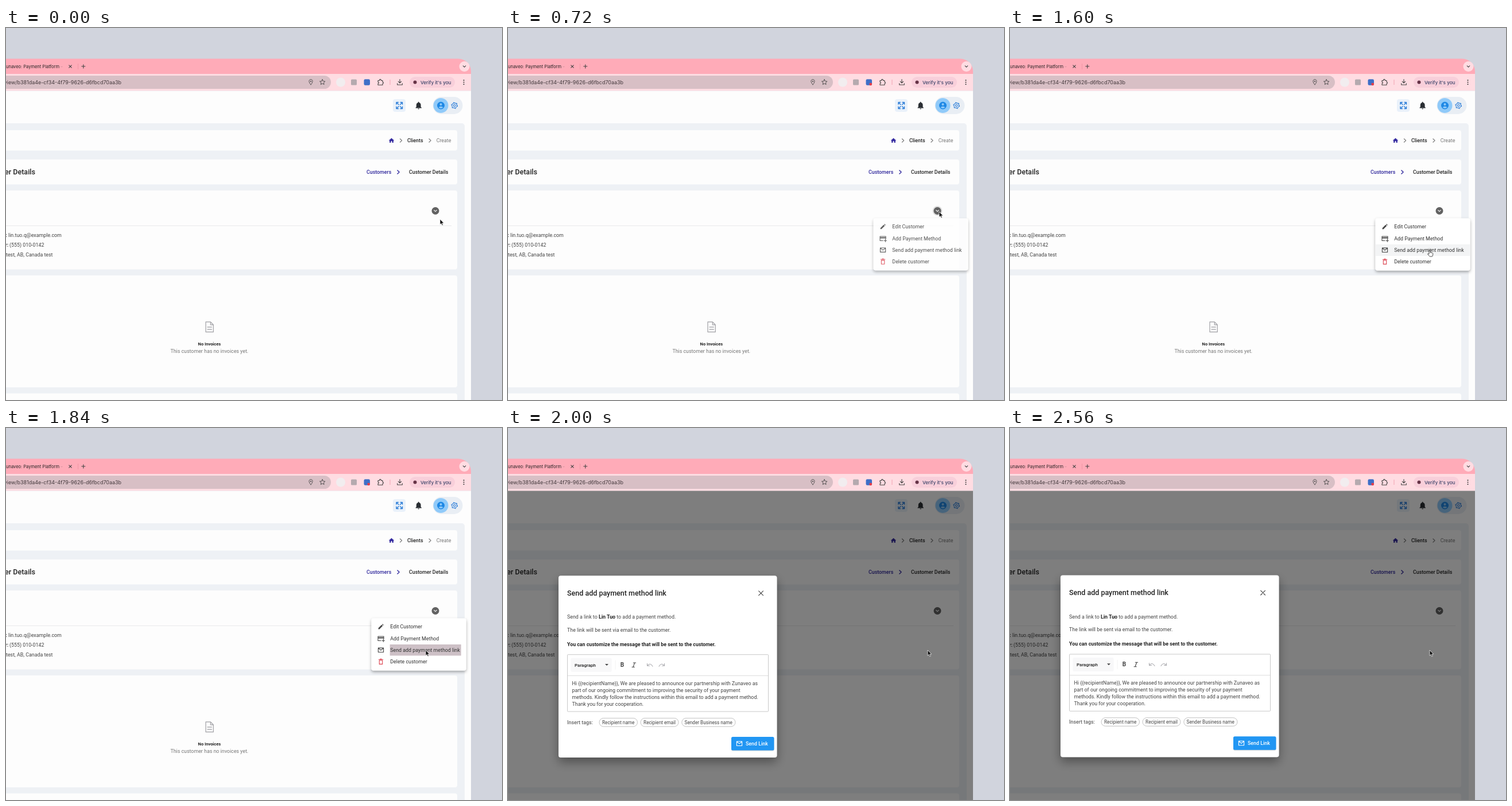
These frames come from a looping animation (864x648 px, 3.2 s). An HTML page:

```html
<!DOCTYPE html>
<html lang="en">
<head>
<meta charset="utf-8">
<title>Send add payment method link</title>
<style>
  html, body { margin: 0; width: 100%; height: 100%; overflow: hidden; background: #d1d4dd; }
  svg { display: block; width: 864px; height: 648px; font: 8.85px Roboto, sans-serif; fill: #444; }
  .ui { font-family: Inter, sans-serif; }
  .medium { font-weight: 500; }
  .bold { font-weight: 700; }
  .dark { fill: #222; }
  .end { text-anchor: end; }
  .mid { text-anchor: middle; }
  .line { fill: none; stroke: #444; stroke-width: 1.1; stroke-linecap: round; stroke-linejoin: round; }
  .thin { stroke-width: .9; }
  .thick { stroke-width: 1.4; }
  .blue { stroke: #2f7fd8; }
  .indigo { stroke: #2d259b; }
  .grey { stroke: #777; }
  .pale { stroke: #acacb0; }
  .white { stroke: #fff; }
  .red { stroke: #dc4350; }
  .card { fill: #fdfdfd; }
  .chip { fill: #fff; stroke: #a8a8a8; stroke-width: .7; }
  .small { font-size: 8.2px; }
</style>
</head>
<body>
<svg viewBox="0 0 864 648">
  <defs>
    <path id="right" d="M-1.6-3 1.6 0-1.6 3"/>
    <path id="down" d="M-2.3-1.1 0 1.2 2.3-1.1"/>
    <path id="envelope" d="M-4.6-3.7H4.6V3.7H-4.6ZM-4.6-3.3 0 .2 4.6-3.3"/>
    <filter id="menuShadow" x="-15%" y="-15%" width="130%" height="140%">
      <feDropShadow dx="0" dy="2.5" stdDeviation="2.7" flood-opacity=".34"/>
    </filter>
    <filter id="dialogShadow" x="-15%" y="-15%" width="130%" height="135%">
      <feDropShadow dx="0" dy="8" stdDeviation="9" flood-opacity=".36"/>
    </filter>
  </defs>

  <rect width="864" height="648" fill="#d1d4dd"/>

  <!-- Browser bar -->
  <path d="M0 53.5H788a22 22 0 0 1 22 22V81H0Z" fill="#ffabb8"/>
  <rect y="80" width="810" height="29.5" fill="#ffdce2"/>
  <g class="ui">
    <text class="end dark" x="93" y="69.6" font-size="7.5">Zunaveo: Payment Platform</text>
    <text x="95" y="69.6" font-size="7.5" opacity=".3">–</text>
    <path class="line" d="m109.8 64.8 4.4 4.4m0-4.4-4.4 4.4M131.7 66.8h6.2m-3.1-3.1v6.2"/>
    <path d="M125.5 62v10" stroke="#e98e9d" stroke-width=".7"/>
    <circle cx="798.5" cy="67" r="9" fill="#ffdce2"/>
    <use href="#down" x="798.5" y="67" class="line"/>
    <path d="M0 83H554.5a11.5 11.5 0 0 1 0 23H0Z" fill="#d8bfc5"/>
    <text class="end" x="201" y="97.5" font-size="8.95" fill="#44383c">view/b381da4e-cf34-4f79-9626-d6fbcd70aa3b</text>
    <path class="line thin" d="M531 98.7c-4.6-5-3.5-9 0-9s4.6 4 0 9Z"/>
    <circle cx="531" cy="93" r="1.1"/>
    <path class="line thin" d="m551.2 89.6 1.4 3 3.3.4-2.5 2.2.7 3.2-2.9-1.7-2.9 1.7.7-3.2-2.5-2.2 3.3-.4Z"/>
    <circle cx="583" cy="94.5" r="8" fill="#f2edef"/>
    <rect x="601" y="89.5" width="10" height="10" rx="1.5" fill="#b5aaaf"/>
    <rect x="623.5" y="89.3" width="10.5" height="10.5" rx="2.3" fill="#3f6fc8"/>
    <circle id="badge" cx="631.7" cy="97.8" r="2.4" fill="#e53d48"/>
    <path class="line" d="M648 91.5h2.500v-.7a1.400 1.400 0 0 1 2.800 0v.7h2.700v2.600a1.400 1.400 0 0 1 0 2.800v2.300h-8v-2.300a1.400 1.400 0 0 0 0-2.800Z"/>
    <path d="M669 90v9" stroke="#f2a3b2"/>
    <path class="line" d="M686 89.5v6.3m-2.7-2.600 2.700 2.700 2.700-2.700M681.700 96.500v2.500h8.600v-2.500"/>
    <rect x="703" y="85" width="79" height="19" rx="9.5" fill="#f8cfda"/>
    <circle cx="712.5" cy="94.5" r="3" fill="#673347"/>
    <text class="medium" x="722" y="97.6" font-size="8.15" fill="#384067">Verify it's you</text>
    <g fill="#333"><circle cx="797.5" cy="91" r="1"/><circle cx="797.5" cy="94.5" r="1"/><circle cx="797.5" cy="98" r="1"/></g>
  </g>

  <!-- Page -->
  <rect y="109.5" width="810" height="539" fill="#fdfdfd"/>
  <path d="M0 166H794a5 5 0 0 1 5 5V648H0Z" fill="#eef1f5"/>
  <rect x="674" y="124" width="22" height="22" rx="4" fill="#e9f1fa"/>
  <path class="line thick blue" d="M680 133v-3.500h3.500M680 129.500l4 4M687 129.500h3.500v3.500M690.500 129.500l-4 4M680 137v3.500h3.500M680 140.500l4-4M687 140.500h3.500V137M690.500 140.500l-4-4"/>
  <path d="M713.5 138.800l1.300-1.400v-3.500c0-2 1.300-3.400 3-3.800v-.6a.9.900 0 0 1 1.800 0v.6c1.800.4 3 1.800 3 3.800v3.500l1.300 1.400v.6h-10.400ZM717.400 140.200h2.600a1.300 1.300 0 0 1-2.600 0Z" fill="#2a2e33"/>
  <rect x="743.5" y="120" width="52" height="30" rx="15" fill="#e9eef4"/>
  <circle cx="757.5" cy="135" r="13" fill="#90caf9"/>
  <circle cx="757.5" cy="135" r="6.5" fill="#1e88e5"/>
  <circle cx="757.5" cy="133" r="2" fill="#90caf9"/>
  <path d="M753.5 138.300q4-3.500 8 0-4 3.500-8 0Z" fill="#90caf9"/>
  <circle class="line blue" cx="781.2" cy="135" r="1.8"/>
  <circle class="line blue" cx="781.2" cy="135" r="4.4"/>
  <circle class="line blue" cx="781.2" cy="135" r="5.3" stroke-dasharray="2 3.55" style="stroke-linecap:butt"/>

  <g class="card">
    <rect x="-9" y="178" width="795" height="35.5" rx="4"/>
    <rect x="-9" y="229" width="795" height="43.5" rx="4"/>
    <rect x="-9" y="283" width="795" height="137.5" rx="4"/>
    <rect x="-9" y="431" width="795" height="195" rx="4"/>
    <rect x="-9" y="636.5" width="795" height="30" rx="4"/>
  </g>
  <path d="m671.5 191.700 4.700 4.300h-1.300v3.800h-2.400v-2.700h-2v2.700h-2.400V196h-1.300Z" fill="#352ba0"/>
  <use href="#right" x="688" y="196" class="line grey"/>
  <text class="medium dark" x="699" y="199.2">Clients</text>
  <use href="#right" x="738.5" y="196" class="line grey"/>
  <text x="749.7" y="199.2" fill="#777">Create</text>
  <text class="medium dark end" x="51" y="255.2" font-size="12.5">Customer Details</text>
  <text class="medium" x="628" y="254.2" fill="#2d259b">Customers</text>
  <use href="#right" x="683.5" y="251" class="line thick indigo"/>
  <text class="medium dark" x="702" y="254.2">Customer Details</text>
  <circle id="halo" cx="748" cy="318.5" r="8.5" fill="#000" opacity=".12"/>
  <circle cx="748" cy="318.5" r="6.5" fill="#626262"/>
  <use href="#down" x="748" y="318.5" class="line white"/>
  <path d="M0 344.5H776" stroke="#e5e6e8" stroke-width=".8"/>
  <text class="bold" x="-.7" y="363.7">:</text>
  <text x="4" y="363.7">lin.tuo.q@example.com</text>
  <text class="bold" x="-1.5" y="380.5">r:</text>
  <text x="6" y="380.5">(555) 010-0142</text>
  <text x="0" y="397.5">test, AB, Canada test</text>
  <path class="line thick pale" d="M348 512h8.300l5 5v12.500H348ZM356.300 512v5h5M351 521h7.300M351 525h7.300"/>
  <text class="bold mid dark" x="354.4" y="553.2" font-size="7.5">No Invoices</text>
  <text class="mid" x="354.3" y="566.4" fill="#777">This customer has no invoices yet.</text>

  <!-- Action menu -->
  <g id="menu">
    <rect x="636.5" y="331.5" width="165" height="91" rx="4" fill="#fff" filter="url(#menuShadow)"/>
    <rect id="hover" x="636.5" width="165" height="20.3" fill="#f3f4f5"/>
    <circle id="ripple" cx="731" cy="387" fill="#000" opacity=".08"/>
    <rect id="selection" x="668.7" y="377" width="124" height="19.5" fill="#cdc0c6"/>
    <path d="m648.6 348.500 5.700-5.700 1.900 1.900-5.700 5.700h-1.900ZM655 342.100l.9-.9 1.900 1.900-.9.9Z"/>
    <path class="line" d="M653 370.500H648V363H658v4.200M655 370.300h4.500m-2.200-2.200v4.400"/>
    <path d="M648 364.5h10v2h-10Z"/>
    <use href="#envelope" x="653" y="386.8" class="line"/>
    <path class="line red" d="M650.3 404.800h5.400v6.600h-5.400ZM649.300 403.200h7.400M652 402.300h2"/>
    <g fill="#333">
      <text x="669.3" y="349.3">Edit Customer</text>
      <text x="669.3" y="369.6">Add Payment Method</text>
      <text x="669.3" y="389.9">Send add payment method link</text>
      <text x="669.3" y="410.2">Delete customer</text>
    </g>
  </g>

  <rect id="overlay" y="109.5" width="810" height="539" fill="#000"/>

  <!-- Dialog -->
  <g id="dialog">
    <rect x="88" y="256.5" width="380.5" height="316.8" rx="4" fill="#fff" filter="url(#dialogShadow)"/>
    <text class="medium dark" x="103" y="291.2" font-size="12.5">Send add payment method link</text>
    <path class="line" d="m436.7 283.200 7.800 7.800m0-7.800-7.800 7.800"/>
    <text x="103" y="331.6">Send a link to <tspan class="bold dark">Lin Tuo</tspan> to add a payment method.</text>
    <text x="103" y="354.2">The link will be sent via email to the customer.</text>
    <text class="bold dark" x="103" y="378.8" font-size="8.8">You can customize the message that will be sent to the customer.</text>
    <rect x="103.5" y="394" width="350" height="99.2" rx="1" fill="none" stroke="#c2c2c2" stroke-width=".9"/>
    <path d="M104 430.700h349" stroke="#d3d3d3" stroke-width=".8"/>
    <rect x="109.5" y="400" width="71" height="24" rx="2" fill="#f8f8f9"/>
    <text class="medium dark" x="116" y="414.8" font-size="8">Paragraph</text>
    <path d="M169 410.300h6l-3 3Z"/>
    <path d="M187 404v16" stroke="#eee" stroke-width=".7"/>
    <text class="bold mid" x="199" y="415.4" font-size="10">B</text>
    <path class="line" d="M218.300 408.200h4.300M216 415.700h4.300M220.700 408.200l-2.700 7.500"/>
    <path class="line pale" d="M242.500 409.500v4h4M242.800 413.200q5-6 9.200 1.300M272.500 409.500v4h-4M272.200 413.200q-5-6-9.200 1.300"/>
    <text x="111.5" y="447.4">Hi {{recipientName}}, We are pleased to announce our partnership with Zunaveo as</text>
    <text x="111.5" y="459.2">part of our ongoing commitment to improving the security of your payment</text>
    <text x="111.5" y="471">methods. Kindly follow the instructions within this email to add a payment method.</text>
    <text x="111.5" y="482.8">Thank you for your cooperation.</text>
    <text class="medium" x="103" y="515" fill="#666">Insert tags:</text>
    <rect class="chip" x="159" y="504.7" width="66.5" height="14.6" rx="7.3"/>
    <rect class="chip" x="231" y="504.7" width="66" height="14.6" rx="7.3"/>
    <rect class="chip" x="302.8" y="504.7" width="93.2" height="14.6" rx="7.3"/>
    <g class="mid small">
      <text x="192.2" y="514.9">Recipient name</text>
      <text x="264" y="514.9">Recipient email</text>
      <text x="349.2" y="514.9">Sender Business name</text>
    </g>
    <rect x="389" y="538.3" width="74.5" height="23.5" rx="2.5" fill="#000" opacity=".18"/>
    <rect x="389" y="537.3" width="74.5" height="23.5" rx="2.5" fill="#2196f3"/>
    <use href="#envelope" x="403" y="549" class="line white"/>
    <text class="medium" x="414" y="552.2" fill="#fff">Send Link</text>
  </g>

  <g id="cursor">
    <path id="arrow" d="M0 0V9.500L2.200 7.500 3.700 11 5.300 10.300 3.800 6.900H6.800Z" fill="#111" stroke="#fff" stroke-width=".7"/>
    <path id="hand" d="M-1 .9a1 1 0 0 1 2 0V4l3.700.8q1.200.3 1.100 1.600L5.200 9.800Q5 11 4 11H.6q-.8 0-1.200-.7L-3.600 6.600q.6-1.200 1.800-.2L-1 7Z" fill="#fff" stroke="#222" stroke-width=".8"/>
  </g>
</svg>
<script>
  const LOOP = 3200, STEP = 80;
  const ROW_TOP = 336.2, ROW_HEIGHT = 20.3;
  const part = Object.fromEntries([...document.querySelectorAll('[id]')].map(e => [e.id, e]));

  const progress = (t, start, end) => Math.min(1, Math.max(0, (t - start) / (end - start)));
  const easeOut = p => 1 - (1 - p) ** 3;
  const mix = (a, b, p) => a + (b - a) * p;
  const show = (name, visible) => part[name].setAttribute('visibility', visible ? 'inherit' : 'hidden');
  const set = (name, key, value) => part[name].setAttribute(key, value);

  function drawMenu(t) {
    const closing = t >= 1840;
    const opacity = closing ? 1 - easeOut(progress(t, 1840, 1980)) : easeOut(progress(t, 580, 880));
    const grow = closing ? 1 - progress(t, 1840, 1973) : easeOut(progress(t, 580, 747));
    show('menu', opacity > 0);
    set('menu', 'opacity', opacity);
    set('menu', 'transform',
      `translate(719 331) scale(${mix(.75, 1, grow)} ${mix(.5625, 1, grow)}) translate(-719 -331)`);
    show('ripple', t >= 1600 && !closing);
    set('ripple', 'r', mix(4, 10, progress(t, 1600, 1760)));
    show('selection', closing && opacity > 0);
  }

  function drawCursor(t) {
    const toButton = progress(t, 0, 560);
    const toItem = easeOut(progress(t, 1040, 1440));
    const x = mix(mix(756, 751, toButton), 731, toItem);
    const y = mix(mix(333, 320, toButton), 387, toItem);
    set('cursor', 'transform', `translate(${x} ${y})`);

    const row = Math.floor((y - ROW_TOP) / ROW_HEIGHT);
    const overItem = t >= 1120 && t < 1840 && row >= 0;
    const overButton = t >= 400 && t < 640;
    show('hover', overItem);
    set('hover', 'y', ROW_TOP + row * ROW_HEIGHT);
    show('hand', overItem || overButton);
    show('arrow', !overItem && !overButton);
    show('halo', t >= 400 && t < 1040);
  }

  function draw() {
    const t = Math.floor(performance.now() % LOOP / STEP) * STEP;
    drawMenu(t);
    drawCursor(t);
    show('badge', t >= 320);
    set('overlay', 'opacity', .5 * easeOut(progress(t, 1840, 1960)));
    show('dialog', t >= 1920);
    set('dialog', 'transform', `translate(0 ${40 * Math.exp((1920 - t) / 20)})`);
    requestAnimationFrame(draw);
  }
  draw();
</script>
</body>
</html>
```
